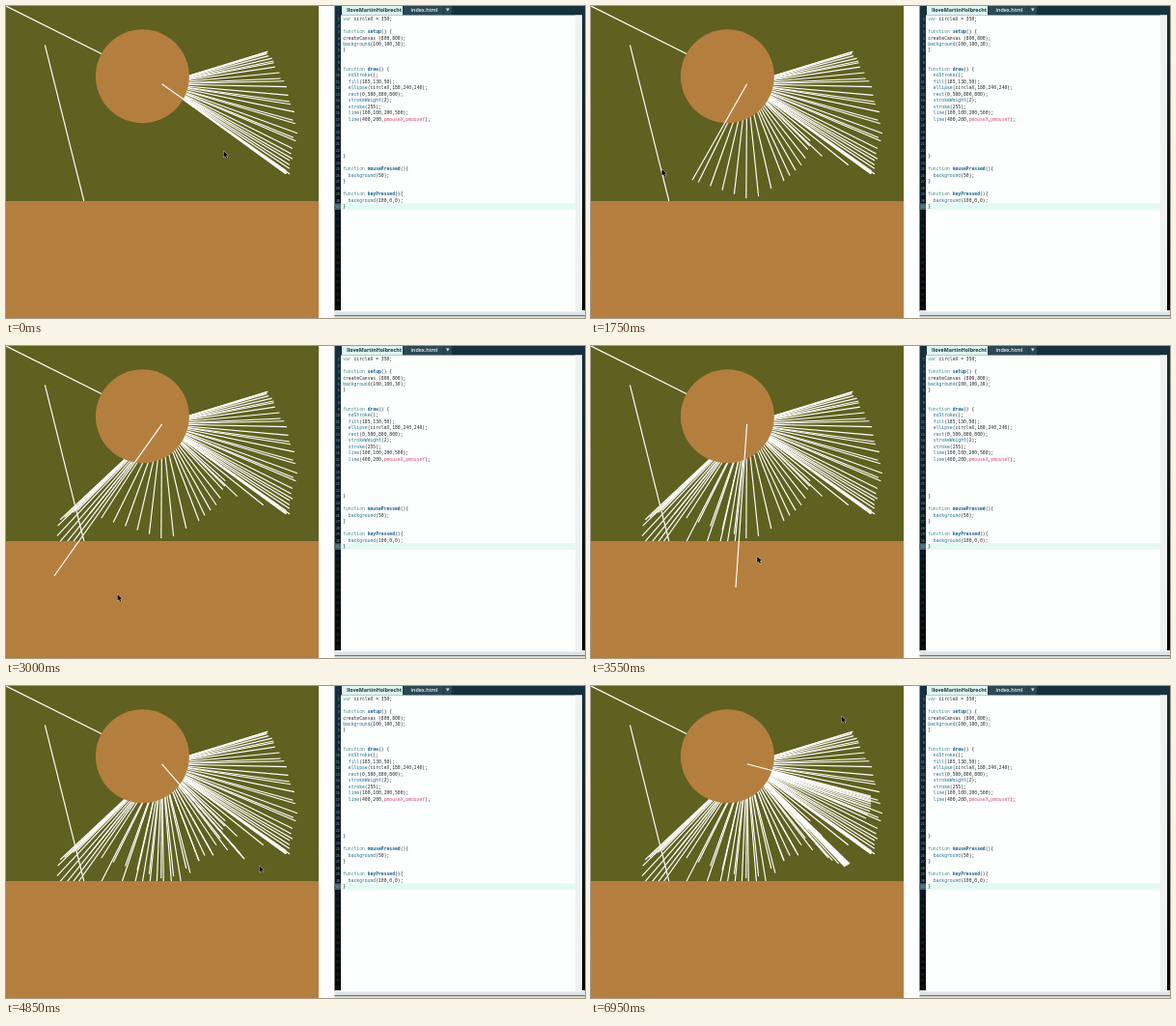
Write an HTML page with a canvas that moves like this. It is 600 by 323 pixels and loops after 7000 ms.

```html
<!DOCTYPE html>
<html lang="en">
<head>
<meta charset="utf-8">
<style>
html, body { margin: 0; width: 100%; height: 100%; overflow: hidden; background: #fff; }
canvas { display: block; }
</style>
</head>
<body>
<canvas id="stage" width="600" height="323"></canvas>
<script>
const LOOP = 7000, STEP = 50, RAY_STEP = 100, LAG = 250;
const S = 0.404, WIDTH = 324;
const OLIVE = '#606020', OCHRE = '#b47f3e';
const ctx = document.getElementById('stage').getContext('2d');

// Turning points of the pointer: time, x, y.
const path = [
  [-250, 294, 174], [0, 226, 151], [120, 228, 137], [400, 221, 162],
  [750, 200, 181], [1000, 167, 201], [1750, 74, 170], [2200, 54, 181],
  [2750, 50, 238], [3000, 116, 258], [3300, 150, 250], [3850, 200, 181],
  [4100, 237, 167], [4600, 247, 179], [4850, 263, 187], [5650, 268, 184],
  [5850, 285, 137], [6100, 290, 128], [6700, 290, 114], [6950, 260, 32]
];

function pointer(t) {
  const i = Math.max(1, path.findIndex(p => p[0] >= t));
  const [t0, x0, y0] = path[i - 1], [t1, x1, y1] = path[i];
  const k = (t - t0) / (t1 - t0);
  return [x0 + (x1 - x0) * k, y0 + (y1 - y0) * k];
}

function seeded(seed) {
  return () => (seed = seed * 16807 % 2147483647) / 2147483647;
}

// The fan present at the start, densest at its two ends.
const random = seeded(41);
const fan = Array.from({ length: 31 }, (_, i) => {
  const k = 0.5 - 0.5 * Math.cos(Math.PI * (i + random() * 0.8) / 30.8);
  return [273 + 29 * Math.sin(2.4 * k) - 4 * random(), 47 + 127 * k];
});

function rect(color, x, y, w, h) {
  ctx.fillStyle = color;
  ctx.fillRect(x, y, w, h);
}

function polygon(points) {
  ctx.beginPath();
  for (const [x, y] of points) ctx.lineTo(x, y);
  ctx.closePath();
}

function line(x0, y0, x1, y1) {
  ctx.beginPath();
  ctx.moveTo(x0, y0);
  ctx.lineTo(x1, y1);
  ctx.stroke();
}

const ray = ([x, y]) => line(400 * S, 200 * S, x, y);

// Small type is set large and scaled down so that its spacing stays exact.
function text(str, x, y, size, color, family, weight = 400) {
  ctx.save();
  ctx.translate(x, y);
  ctx.scale(0.1, 0.1);
  ctx.font = `${weight} ${size * 10}px ${family}`;
  ctx.fillStyle = color;
  ctx.fillText(str, 0, 0);
  ctx.restore();
}

const MONO = '"DejaVu Sans Mono", "Noto Sans Mono", monospace';
const SANS = '"Open Sans", "Noto Sans", sans-serif';
const code = `var circleX = 350;

function setup() {
createCanvas (800,800);
background(100,100,30);
}


function draw() {
  noStroke();
  fill(185,130,50);
  ellipse(circleX,180,240,240);
  rect(0,500,800,800);
  strokeWeight(2);
  stroke(255);
  line(100,100,200,500);
  line(400,200,pmouseX,pmouseY);





}

function mousePressed(){
  background(50);
}

function keyPressed(){
  background(100,0,0);
}`.split('\n');

function tokenStyle(token) {
  if (/^(function|var)$/.test(token)) return ['#3f8f86', 400];
  if (/^(setup|draw|mousePressed|keyPressed)$/.test(token)) return ['#12608c', 700];
  if (/^pmouse/.test(token)) return ['#d9486a', 400];
  if (/^[a-z]/.test(token) && !/^(circleX|createCanvas)$/.test(token)) return ['#1c6c92', 400];
  return ['#24292c', 400];
}

function drawEditor() {
  rect('#fff', WIDTH, 0, 600 - WIDTH, 323);
  const shade = ctx.createLinearGradient(0, 0, 0, 316);
  shade.addColorStop(0, '#17323e');
  shade.addColorStop(1, '#020607');
  rect(shade, 340.5, 0, 259.5, 316);
  rect('#dde4e6', 340.5, 315, 259.5, 8);
  rect('#667980', 340.5, 320, 259.5, 1.2);
  rect('#dff5f1', 348, 0, 63, 9.5);
  rect('#2c4854', 411.5, 0, 41.5, 9);
  rect('#2c4854', 453.6, 0, 8.4, 9);
  rect('#fdfefe', 347, 9.5, 250, 307);
  rect('#f0f2f2', 590, 9.5, 7, 307);
  rect('#e3faf4', 347, 204.3, 243, 6.6);
  rect('#47646e', 340.5, 204.3, 6.5, 6.6);

  text('IloveMartinHolbrecht', 353, 5.6, 5.3, '#16343c', SANS, 700);
  text('index.html', 419.5, 5.6, 5.4, '#f2f6f7', SANS, 600);
  polygon([[456, 2.4], [459.6, 2.4], [457.8, 5.6]]);
  ctx.fillStyle = '#d9e2e5';
  ctx.fill();

  const pitch = 6.467, advance = 2.832;
  for (let i = 0; i < 47; i++) {
    const y = 15.1 + i * pitch;
    ctx.textAlign = 'right';
    text(i + 1, 346, y, 3.6, i < code.length ? '#8797a0' : '#22343c', MONO);
    ctx.textAlign = 'left';
    for (const m of (code[i] || '').matchAll(/\w+|[^\w\s]+/g)) {
      const [color, weight] = tokenStyle(m[0]);
      text(m[0], 349.2 + m.index * advance, y, 4.7, color, MONO, weight);
    }
  }
}

function drawSketch(t) {
  ctx.save();
  ctx.beginPath();
  ctx.rect(0, 0, WIDTH, 323);
  ctx.clip();
  rect(OLIVE, 0, 0, WIDTH, 323);
  ctx.strokeStyle = '#fff';
  ctx.lineWidth = 1.15;
  ray([0, 0]);
  fan.forEach(ray);
  for (let s = 0; s < t; s += RAY_STEP) ray(pointer(s - LAG));

  ctx.fillStyle = OCHRE;
  ctx.beginPath();
  ctx.arc(350 * S, 180 * S, 120 * S, 0, 7);
  ctx.fill();
  rect(OCHRE, 0, 500 * S, WIDTH, 323);
  line(100 * S, 100 * S, 200 * S, 500 * S);
  ray(pointer(t - LAG));
  ctx.restore();
}

function drawPointer([x, y]) {
  ctx.save();
  ctx.translate(x - 0.5, y - 0.7);
  polygon([[0, 0], [0, 6.2], [1.5, 5], [2.6, 7.4], [3.7, 6.9], [2.7, 4.5], [4.7, 4.4]]);
  ctx.lineWidth = 1;
  ctx.strokeStyle = '#ddd';
  ctx.stroke();
  ctx.fillStyle = '#000';
  ctx.fill();
  ctx.restore();
}

drawEditor();
const start = performance.now();
function frame() {
  const elapsed = Math.max(0, performance.now() - start) % LOOP;
  const t = Math.floor(elapsed / STEP) * STEP;
  drawSketch(t);
  drawPointer(pointer(t));
  requestAnimationFrame(frame);
}
frame();
</script>
</body>
</html>
```
